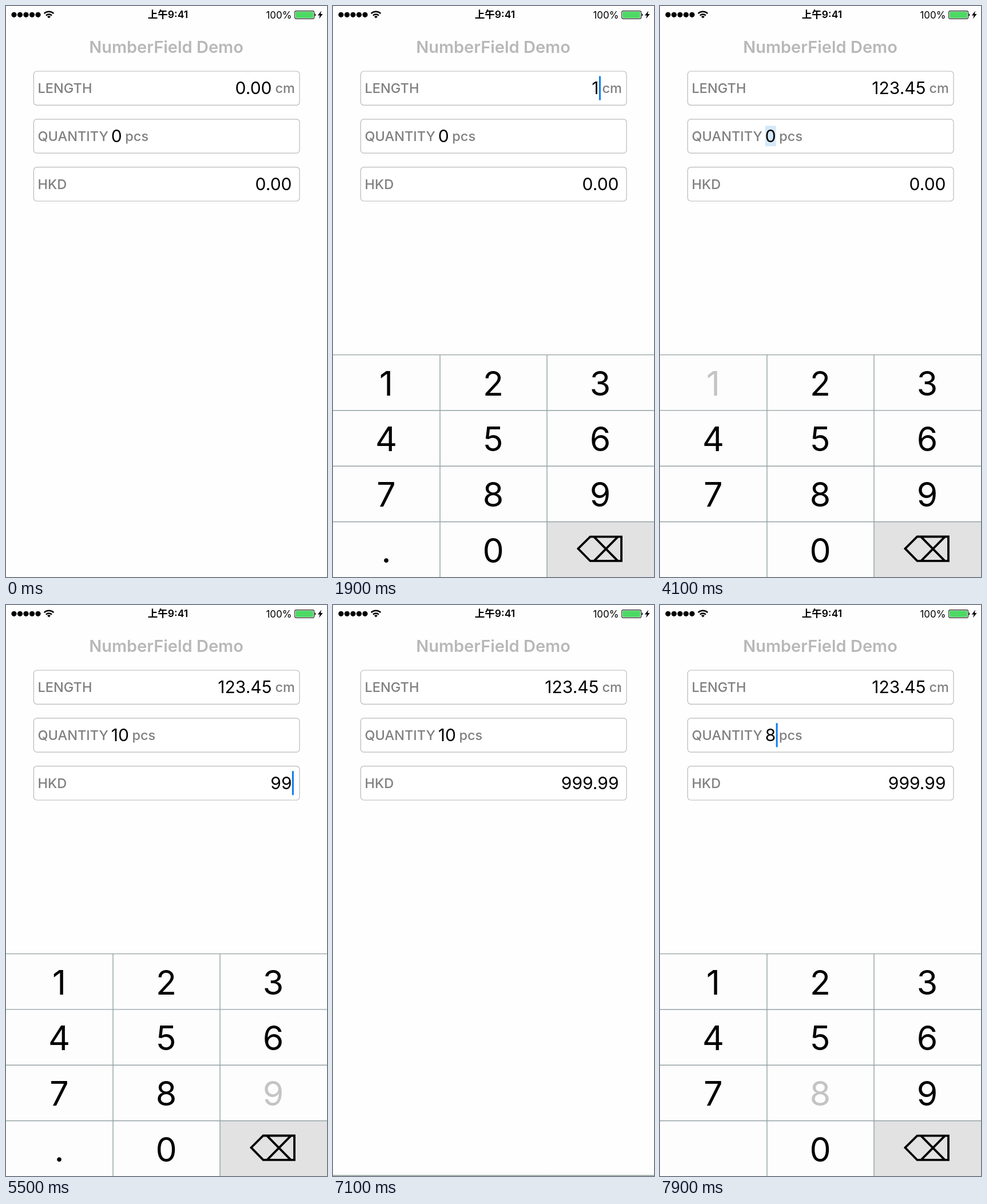
Recreate the animation shown at these times as an HTML page. Size 561x998 px, loop 8 s.

```html
<!DOCTYPE html>
<html lang="en">
<head>
<meta charset="utf-8">
<title>NumberField Demo</title>
<style>
  html, body { margin: 0; width: 100%; height: 100%; overflow: hidden; background: #fefefe; }
  svg { display: block; width: 561px; height: 998px; font-family: Inter, "Noto Sans CJK SC", "Noto Sans CJK", sans-serif; }
  .title { font-size: 29px; font-weight: 600; fill: #b8b8b8; text-anchor: middle; }
  .label { font-size: 23.5px; font-weight: 500; fill: #808080; }
  .value { font-size: 30px; fill: #000; }
  .end { text-anchor: end; }
  .box { fill: #fff; stroke: #b9b9b9; stroke-width: 1.2; }
  .sel { fill: #d5e8f8; }
  .caret { fill: #0f7bea; }
  .key { font-size: 59px; text-anchor: middle; }
  .grid { fill: none; stroke: #93a1a1; stroke-width: 1.4; }
</style>
</head>
<body>
<svg id="stage" viewBox="0 0 561 998" xmlns="http://www.w3.org/2000/svg">
  <rect width="561" height="998" fill="#fefefe"/>
  <g id="status">
    <g fill="none" stroke="#000" stroke-width="2.5">
      <path d="M66.7 13.2a11.8 11.8 0 0 1 16.6 0M70 16.6a7.2 7.2 0 0 1 10 0"/>
    </g>
    <path d="M75 21.6l-3-3a4.3 4.3 0 0 1 6 0z"/>
    <text x="283" y="21.3" font-size="17.5" font-weight="600" text-anchor="middle">上午9:41</text>
    <text x="499.5" y="21.7" font-size="17" text-anchor="end">100%</text>
    <rect x="504.6" y="8.6" width="34" height="13.8" rx="2.6" fill="#fff" stroke="#222" stroke-width="1.1"/>
    <rect x="506" y="10" width="31.2" height="11" rx="1.4" fill="#4cd964"/>
    <path d="M539.6 13v5q1.8-.6 1.8-2.5t-1.8-2.5z"/>
    <path d="M551.2 8.6l-6.4 8h3.7l-1.4 5.6 6.6-8.2h-3.8z"/>
  </g>
  <text class="title" x="280" y="82.3">NumberField Demo</text>
  <g id="fields"></g>
  <g id="pad"></g>
</svg>
<script>
const LOOP = 8000, STEP = 100;
const PAD_TOP = 609.6, PAD_DROP = 390.4, ROW = 97.3, COL = 187;
const CARET_MS = 280;

// Each key: [label, touch down, value entered, touch up]
const sessions = [
  { field: 0, start: 1190, keys: [
    ['1', 1690, 1780, 1860], ['2', 1990, 2080, 2150], ['3', 2190, 2280, 2350],
    ['.', 2390, 2480, 2550], ['4', 2780, 2890, 2950], ['5', 2990, 3090, 3190]] },
  { field: 1, start: 3590, keys: [['1', 3980, 4190, 4250], ['0', 4290, 4390, 4480]] },
  { field: 2, start: 4790, keys: [
    ['9', 5090, 5290, 5350], ['9', 5390, 5490, 5560], ['9', 5650, 5750, 5850],
    ['.', 5940, 6050, 6120], ['9', 6190, 6290, 6350], ['9', 6390, 6490, 6560]] },
  { field: 1, start: 7190, keys: [['8', 7690, 7890, 7990]] }
];
const slides = [[1190, 0], [6665, 1], [7190, 0]];

function make(tag, parent, attrs, text) {
  const el = document.createElementNS('http://www.w3.org/2000/svg', tag);
  for (const name in attrs) el.setAttribute(name, attrs[name]);
  if (text !== undefined) el.textContent = text;
  parent.appendChild(el);
  return el;
}
const byId = id => document.getElementById(id);
const set = (el, attrs) => { for (const name in attrs) el.setAttribute(name, attrs[name]); };
const show = (el, on) => el.setAttribute('visibility', on ? 'inherit' : 'hidden');

for (let i = 0; i < 5; i++) make('circle', byId('status'), { cx: 14 + i * 10.5, cy: 15.3, r: 4.6 });

const fields = [
  { label: 'LENGTH', zero: '0.00', right: 464.5, unit: 'cm' },
  { label: 'QUANTITY', zero: '0', left: 183.7, unit: 'pcs' },
  { label: 'HKD', zero: '0.00', right: 499.5, unit: '' }
];
fields.forEach((f, i) => {
  const g = make('g', byId('fields'), { transform: `translate(0 ${i * 83.8})` });
  make('rect', g, { class: 'box', x: 48.4, y: 114, width: 464.6, height: 59.4, rx: 5.5 });
  f.sel = make('rect', g, { class: 'sel', y: 125.6, height: 35.8 });
  make('text', g, { class: 'label', x: 55.5, y: 152.2 }, f.label);
  f.value = make('text', g, { class: f.right ? 'value end' : 'value', x: f.right || f.left, y: 154.3 });
  f.unitText = make('text', g, { class: 'label', x: 470.5, y: 152.2 }, f.unit);
  f.caret = make('rect', g, { class: 'caret', y: 122.6, width: 3, height: 42 });
});

const pad = byId('pad'), keys = {};
make('rect', pad, { y: 0, width: 561, height: 400, fill: '#fdfdfe' });
make('rect', pad, { x: 2 * COL, y: 3 * ROW, width: COL, height: 110, fill: '#e2e2e2' });
make('path', pad, { class: 'grid', d: [0, 1, 2, 3].map(r => `M0 ${r * ROW}H561`).join('') + `M${COL} 0V400M${2 * COL} 0V400` });
[...'123456789.0'].forEach((c, i) => {
  keys[c] = make('text', pad, { class: 'key', x: 93 + (i % 3) * COL, y: 71.2 + Math.floor(i / 3) * ROW }, c);
});
make('path', pad, {
  d: 'M428.5 338.8L449.5 317.9H504V360.3H449.5ZM456.5 318.5L497.5 360M497.5 318.5L456.5 360',
  fill: 'none', stroke: '#000', 'stroke-width': 3.8
});

// Critically damped spring: share of the way left after ms
function remaining(ms) {
  const w = Math.max(0, ms) * 0.016;
  return (1 + w) * Math.exp(-w);
}

function padOffset(t) {
  let pos = 1;
  for (const [start, goal] of slides) {
    if (t >= start) pos = goal + (1 - 2 * goal) * remaining(t - start);
  }
  return pos * PAD_DROP;
}

function draw(t) {
  const values = fields.map(f => f.zero);
  let active = null, selected = false, lastEntry = -1e4, pressed = '';
  for (const s of sessions) {
    if (t < s.start) break;
    active = s.field;
    selected = true;
    for (const [c, down, enter, up] of s.keys) {
      if (t >= down && t < up) pressed = c;
      if (t >= enter) {
        values[active] = selected ? c : values[active] + c;
        selected = false;
        lastEntry = enter;
      }
    }
  }
  fields.forEach((f, i) => {
    f.value.textContent = values[i];
    const width = f.value.getComputedTextLength();
    const left = f.left || f.right - width;
    const right = left + width;
    if (f.left) set(f.unitText, { x: right + 5.7 });
    set(f.sel, { x: left, width });
    set(f.caret, { x: right + 0.4 });
    show(f.sel, i === active && selected);
    show(f.caret, i === active && !selected && t - lastEntry < CARET_MS);
  });
  for (const c in keys) set(keys[c], { fill: c === pressed ? '#c4c4c4' : '#000' });
  show(keys['.'], active !== 1);
  set(pad, { transform: `translate(0 ${PAD_TOP + padOffset(t)})` });
}

function tick() {
  const t = (performance.now() + 4) % LOOP;
  draw(Math.floor(t / STEP) * STEP);
  requestAnimationFrame(tick);
}
draw(0);
tick();
</script>
</body>
</html>
```
